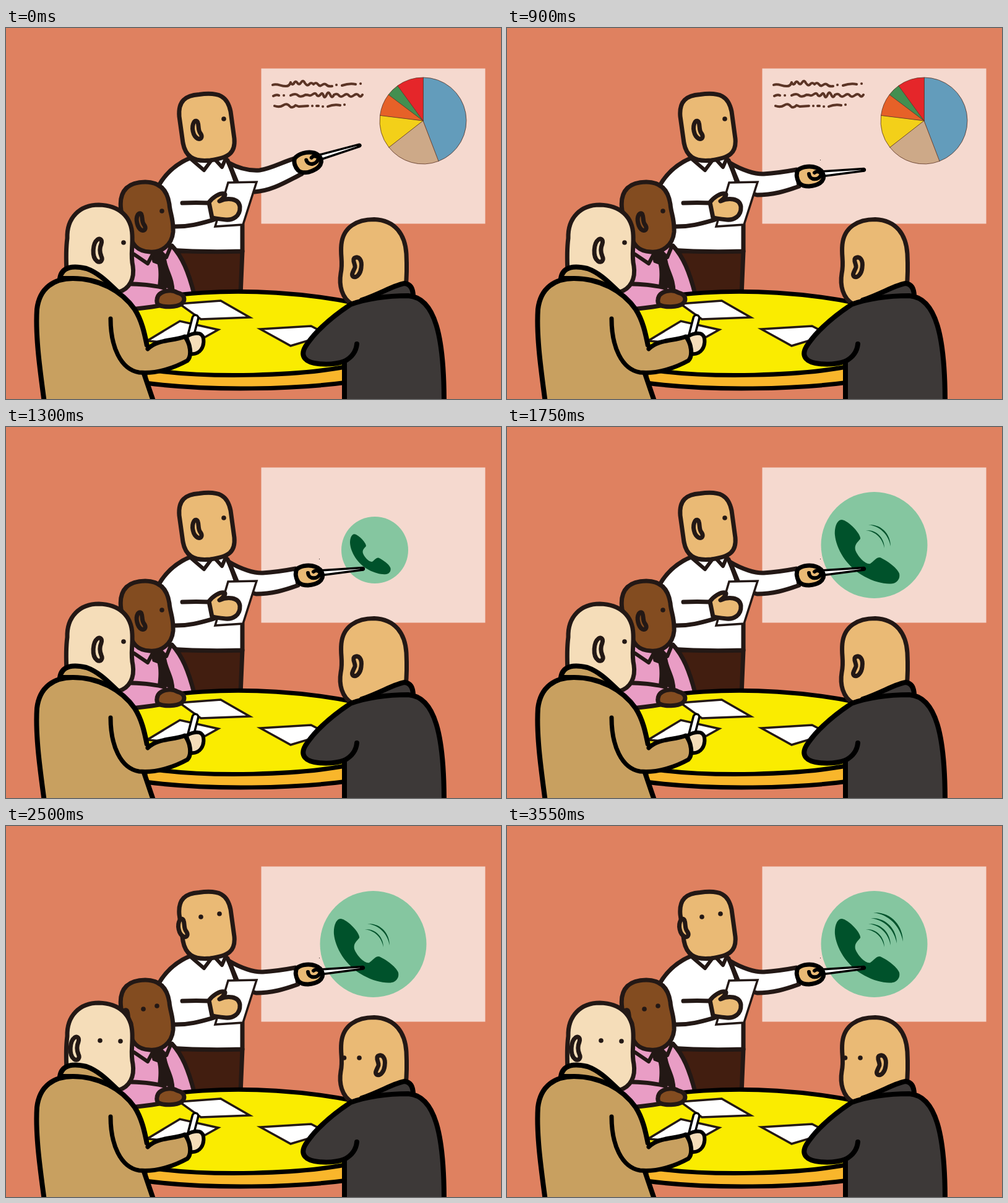
An HTML page that plays this animation: 800 by 600 pixels, repeating every 4.35 s.

```html
<!DOCTYPE html>
<html lang="en">
<head>
<meta charset="utf-8">
<title>Meeting</title>
<style>
html, body { margin: 0; width: 100%; height: 100%; overflow: hidden; background: #df8160; }
svg { display: block; width: 100vw; height: 100vh; }
.ink { stroke: #231815; stroke-width: 7; }
.bold { stroke: #000; stroke-width: 8; }
.medium { stroke-width: 7; }
.thin { stroke-width: 6; }
.line { fill: none; }
.sheet { fill: #fff; stroke: #231815; stroke-width: 3.5; stroke-linejoin: miter; }
.eye { fill: #231815; }
.white { fill: #fff; }
.tan { fill: #eaba75; }
.brown { fill: #834c20; }
.pale { fill: #f5ddb9; }
.pink { fill: #e99dc5; }
.coat { fill: #c8a060; }
.dark { fill: #3d3938; }
</style>
</head>
<body>
<svg viewBox="0 0 800 600" stroke-linecap="round" stroke-linejoin="round">
  <rect x="412.500" y="65.500" width="362" height="251" fill="#f5d9cf"/>

  <g data-on="0-1300">
    <g id="notes" class="line" stroke="#5b3425" stroke-width="4">
      <path d="M431 92c8-3 14 3 22 2q5 0 7-6 2 5 5 2 3-6 6-1 3 4 6-1t6 1q4 6 7 2t7 0q4-4 7 0t7 1 7 0 9 2M534 92h.1M543 93q12-4 22-2M573 90h.1"/>
      <path d="M432 110q5-3 9-1M449 109h.1M460 109q8-4 12 0t12-1q4 0 6 1t6-2 6 1 6 0q3-5 5 1t5-1 6 0 6 0q5-3 8 1t8 0 8 0 8 0 8 0 6-1"/>
      <path d="M434 126q8 3 14-1t10 1t10-1l5 2 15-1M495 126h.1M502 126h3M512 127h.1M520 127q10-4 20-2M547 124h.1"/>
    </g>
    <g id="pie" stroke="#5b3425" stroke-width=".8"></g>
  </g>

  <g id="phone" data-on="1300-4350">
    <circle cx="593.5" cy="191" r="86" fill="#85c6a0"/>
    <path fill="#00522b" d="M541 150C533 150 529 163 530 175C532 196 548 226 578 242C596 252 618 256 627 252C634 248 635 242 634 237C630 227 614 216 603 211C597 210 593 217 587 221C580 223 567 210 563 199C561 190 567 186 571 181C573 174 552 151 541 150Z"/>
    <g id="waves" fill="#00522b"></g>
  </g>

  <!-- presenter -->
  <g class="ink">
    <path fill="#421e10" d="M268 361H382L379 432H300Z"/>
    <path class="white" d="M298 210C272 221 256 237 245 258L262 359Q320 363 382 361V318L372 247L358 214Z"/>
    <path data-on="0-150" class="white" d="M360 218C378 228 395 231 410 230C430 227 450 215 470 210L478 236C450 250 430 263 402 265L376 262L362 222"/>
    <path data-on="150-4350" class="white" d="M360 218C380 230 402 237 415 236C432 235 452 232 468 229L472 256C450 264 430 270 404 270L376 262L362 222"/>
    <path class="line" d="M361 220L373 249"/>
    <path class="white thin" d="M299 212L320 230L332 214M339 214L349 225L356 209"/>
  </g>
  <path class="sheet" d="M359 250L405 249L383 318L338 321Z"/>
  <g class="ink">
    <path class="line" d="M285 283Q307 282 330 283M270 321C295 322 315 316 336 310"/>
    <path class="tan" d="M328 282C333 275 345 266 353 268C356 270 352 275 345 280C358 274 376 275 378 289C379 305 366 311 355 310C345 309 340 308 333 307Z"/>
  </g>
  <g id="pointer" class="bold medium">
    <path class="white" style="stroke-width:3.5" d="M508 232L577 227.500Q580 229 577 231L508 240Z"/>
    <path class="thin" d="M575 229.500h2"/>
    <path class="tan" d="M470 230C478 223 492 223 500 226C509 229 513 237 511 244C508 252 500 255 488 256C480 256 475 254 472 250C468 244 467 236 470 230Z"/>
    <path class="line thin" d="M488 236C489 247 505 247 508 236C505 232 500 231 497 234"/>
  </g>
  <rect data-on="150-4350" x="506" y="213" width="1" height="1" fill="#231815"/>
  <path class="ink tan" d="M280 143C278 118 290 109 312 107.500C345 103 358 111 363 135L369 179C371 202 360 210 330 214C302 217 290 207 286 186Z"/>
  <g data-on="300-900">
    <circle class="eye" cx="315" cy="153" r="3.800"/><circle class="eye" cx="351.500" cy="147" r="3.800"/>
    <path data-on="450-600 750-900" class="eye" d="M326 183Q340 176 352 179Q340 185 326 183Z"/>
    <ellipse data-on="300-450 600-750" class="eye" cx="340" cy="182" rx="9" ry="5"/>
  </g>
  <circle data-on="0-300 900-2500" class="eye" cx="352" cy="147" r="3.800"/>
  <g data-on="2500-4350">
    <circle class="eye" cx="315" cy="147" r="3.800"/><circle class="eye" cx="345" cy="142" r="3.800"/>
  </g>
  <path id="ear1" class="ink tan" d="M304 152C299 160 302 175 310 179C316 181 318 175 314 170C310 165 312 158 310 153C309 150 306 149 304 152Z"/>

  <!-- seated, pink shirt -->
  <g class="ink">
    <path class="pink" d="M200 350L268 352C285 370 295 395 304 430L200 450Z"/>
    <path fill="#231815" style="stroke-width:3" d="M236 368L252 362L258 376C260 392 272 405 271 430H245C247 415 250 395 246 381L238 378Z"/>
    <path class="pink thin" d="M207 366L229 381L237 366M252 364L259 371L266 354"/>
  </g>

  <!-- table -->
  <path class="bold medium" fill="#f9b62b" d="M225 545V574C330 588 470 584 552 573V540Z"/>
  <path class="bold medium" fill="#faec00" d="M150 470C210 425 400 412 560 444L620 500L548 548C480 561 330 569 220 551Z"/>
  <path class="sheet" d="M280 446L347 441L394 468L315 471Z"/>
  <path class="sheet" d="M228 506L281 474L343 488L300 512Z"/>
  <path class="sheet" d="M411 487L493 482L520 496L460 514Z"/>

  <path class="pink" d="M185 414C220 413 240 417 262 421L250 449C235 452 215 453 190 457Z"/>
  <path class="ink line" d="M185 414C220 413 240 417 256 420M190 456Q225 453 248 449"/>
  <path class="ink brown" d="M244 439C246 424 268 422 277 428C290 431 290 441 284 446C275 452 255 452 247 448Q243 445 244 439Z"/>
  <path class="ink brown" d="M186 295C181 260 201 249 225 249C250 249 261 264 264 285C265 300 271 308 270 330C268 352 250 364 232 362C212 361 203 350 200 332Z"/>
  <circle data-on="0-2500" class="eye" cx="252" cy="296" r="3.800"/>
  <g data-on="2500-4350">
    <circle class="eye" cx="222" cy="296" r="3.800"/><circle class="eye" cx="244" cy="291" r="3.800"/>
  </g>
  <path id="ear2" class="ink brown" d="M213 302C209 309 212 323 219 327C225 329 227 323 223 318C219 313 221 306 219 302C218 299 215 299 213 302Z"/>

  <!-- seated, camel coat -->
  <path class="ink pale" d="M98 395C97 375 97 355 99 340C98 307 119 286 150 286C183 287 203 305 204 335C205 355 201 367 205 385C208 405 200 422 182 427L140 430Z"/>
  <circle data-on="0-2500" class="eye" cx="190" cy="347" r="3.800"/>
  <g data-on="2500-4350">
    <circle class="eye" cx="152" cy="347" r="3.800"/><circle class="eye" cx="185" cy="348" r="3.800"/>
  </g>
  <path id="ear3" class="ink pale" d="M148 342C140 348 138 370 147 377C153 381 157 375 154 369C151 362 151 356 154 349C156 343 152 339 148 342Z"/>
  <g class="bold">
    <path class="coat" d="M87 405C90 385 110 384 130 389C150 396 165 412 180 426C155 414 130 404 87 405Z"/>
    <path class="coat" style="stroke:none" d="M62 606C56 560 48 500 51 455C55 420 80 405 108 405C150 405 190 425 210 455C222 475 226 500 229 519L222 556L239 606Z"/>
    <path class="line" d="M62 606C56 560 47 500 50 455C54 420 78 405 108 405C150 405 187 425 208 455C221 475 225 500 229 519M222 556L239 606"/>
    <path class="line" style="stroke-width:13" d="M306 469L299 496"/>
    <path class="line thin" style="stroke:#fff" d="M306 469L299 496"/>
    <path class="pale thin" d="M292 499C300 494 317 489 319 502C321 515 314 529 298 527Z"/>
    <path class="coat medium" d="M169 470C169 515 185 552 215 557C245 560 275 548 293 538C301 530 298 510 289 499C268 507 245 503 229 519"/>
  </g>

  <!-- seated, dark jacket -->
  <path class="ink tan" d="M560 447C542 437 538 415 541 397C545 377 540 370 542 350C545 322 567 309.500 595 309.500C630 311 645 335 647 365C648 385 648 400 646 420L620 440Z"/>
  <g data-on="2500-4350">
    <circle class="eye" cx="546.500" cy="375" r="3.800"/><circle class="eye" cx="571" cy="375" r="3.800"/>
  </g>
  <path id="ear4" class="ink tan" d="M563 372C570 368 576 375 574 388C573 397 567 405 561 402C557 399 562 393 564 387C565 382 559 376 563 372Z"/>
  <g class="bold">
    <path class="dark" d="M575 440C605 430 630 414 645 413C656 415 658 425 658 434Z"/>
    <path class="dark" d="M547 606V539C530 545 515 544 505 543C485 541 474 532 484 515C500 490 530 465 557 447C585 437 620 433 650 433C694 436 708 500 708 606"/>
    <path class="line" d="M547 539C560 532 566 522 567 511"/>
  </g>
</svg>
<script>
const LOOP = 4350;
const $ = id => document.getElementById(id);
const place = (id, value) => $(id).setAttribute('transform', value);
const scaleAt = (s, x, y, toX = x, toY = y) =>
  `translate(${toX} ${toY}) scale(${s}) translate(${-x} ${-y})`;

const slices = [
  [0, 159, '#639cbb'], [159, 232, '#cda988'], [232, 277, '#f3d019'],
  [277, 307, '#e66128'], [307, 324, '#438f50'], [324, 360, '#e5262a']
];
const rim = deg => {
  const a = deg * Math.PI / 180;
  return `${674 + 70 * Math.sin(a)} ${150 - 70 * Math.cos(a)}`;
};
$('pie').innerHTML = slices.map(([from, to, color]) =>
  `<path fill="${color}" d="M674 150L${rim(from)}A70 70 0 0 1 ${rim(to)}Z"/>`).join('');

// Sound waves: tapered crescents growing outward.
$('waves').innerHTML = [0, 1, 2, 3].map(i => {
  const x = 580 + 4 * i, y = 167 - 9 * i, w = 30 + 6 * i, h = 29 + 6 * i;
  return `<path d="M${x} ${y}c${w * .6} ${-h * .03} ${w} ${h * .45} ${w} ${h}` +
    `c${-w * .1} ${-h * .55} ${-w * .47} ${-h * .93} ${-w} ${-h}z"/>`;
}).join('');

const timed = [...document.querySelectorAll('[data-on]')].map(el => ({
  el, spans: el.dataset.on.split(' ').map(s => s.split('-').map(Number))
}));

function draw(t) {
  for (const { el, spans } of timed)
    el.style.display = spans.some(([a, b]) => t >= a && t < b) ? '' : 'none';

  const shrink = t < 1000 ? 0 : t < 1150 ? 1 : 2;
  place('notes', scaleAt(1 - .275 * shrink, 430, 87));
  place('pie', scaleAt(1 - .243 * shrink, 674, 150, 674 - 38 * shrink, 150 + 31 * shrink));
  place('phone', t < 1450 ? scaleAt(.628, 593.5, 191, 596, 199) : '');

  const beat = Math.min(13, Math.floor((t - 1600) / 150));
  const count = beat < 0 ? 0 : (beat + 1) % 5;
  [...$('waves').children].forEach((w, i) => w.style.display = i < count ? '' : 'none');

  place('pointer', t < 150 ? 'translate(-2 -23) rotate(-11 490 240)' : '');
  const turned = t >= 2500;
  place('ear1', turned ? 'translate(-23 0)' : t >= 300 && t < 900 ? 'translate(-21 2)' : '');
  place('ear2', turned ? 'translate(-23 -2)' : '');
  place('ear3', turned ? 'translate(-37 0)' : '');
  place('ear4', turned ? 'translate(38 0)' : '');
}

function tick() {
  draw(performance.now() % LOOP);
  requestAnimationFrame(tick);
}
tick();
</script>
</body>
</html>
```
